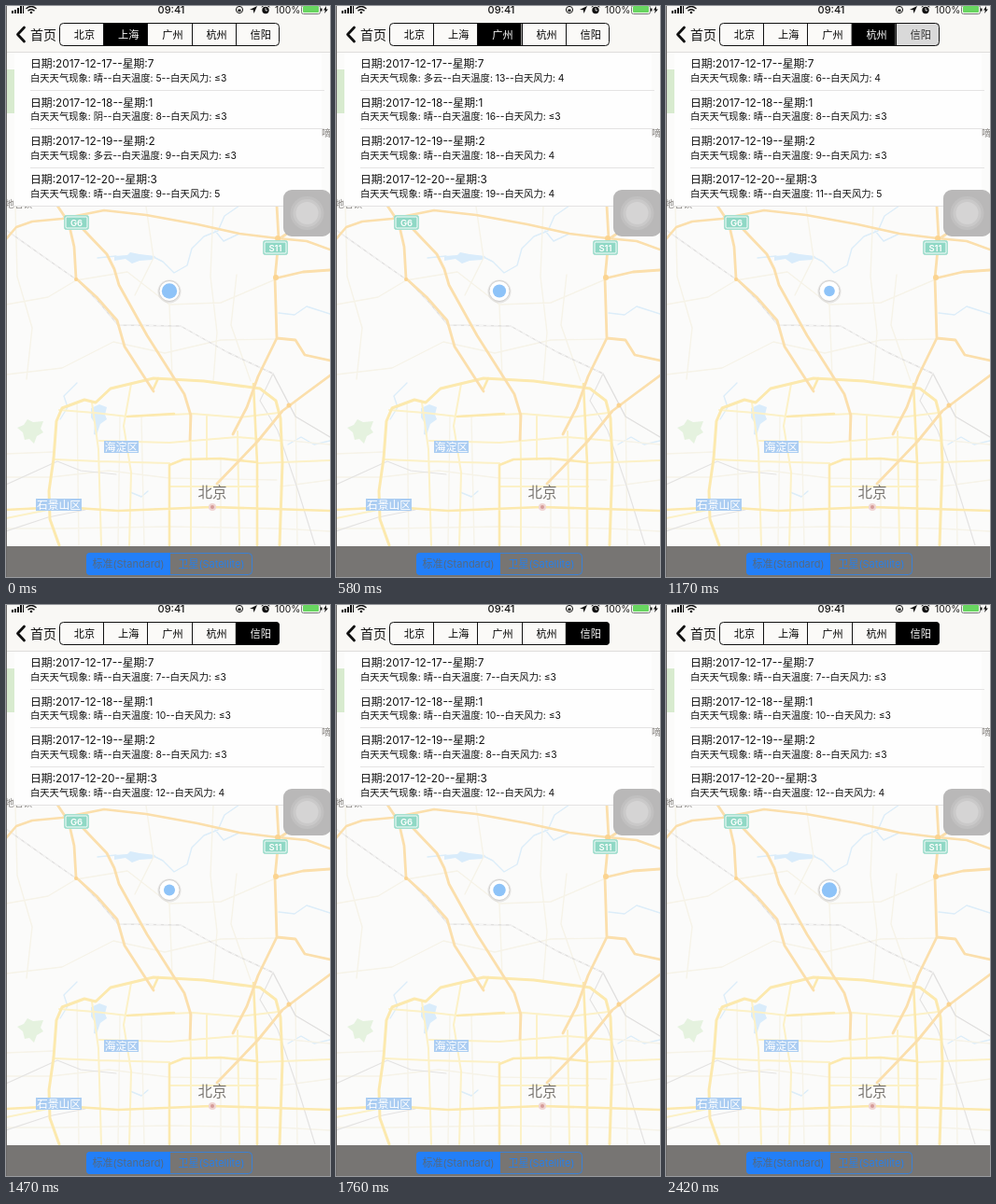
An HTML page that plays this animation: 347 by 612 pixels, repeating every 2470 ms.

```html
<!DOCTYPE html>
<html lang="zh-CN">
<head>
<meta charset="utf-8">
<title>Weather map</title>
<style>
  html, body { margin: 0; width: 100%; height: 100%; overflow: hidden; background: #fbfaf9; }
  svg { display: block; width: 347px; height: 612px; font-family: Inter, "Noto Sans CJK SC", "Noto Sans CJK", sans-serif; }
  .roads path, .line { fill: none; stroke-linejoin: round; stroke-linecap: round; }
  .mid { text-anchor: middle; }
</style>
</head>
<body>
<svg viewBox="0 0 347 612">
  <rect width="347" height="612" fill="#fbfbfa"/>

  <!-- Parks and water -->
  <path d="M0 68H9V115H0Z" fill="#d8ebcf"/>
  <path d="M12 452l7-3 4-6 6 3 11-1-3 8 3 4-7 4-3 8-5-5-5 1-2-8Z" fill="#e5f2df"/>
  <path d="M116 268l14-1 3-3 10 2 17 2-3 4-14 1-8 3-7-5-12 2Z" fill="#d9ecfb"/>
  <path d="M91 431l9-4 8 3-2 8 2 5-7 5-4 12-3-1 1-12-4-6Z" fill="#d9ecfb"/>
  <path class="line" d="M98 270L118 268M158 269L168 274 180 286 194 278 199 260 212 247 227 241 234 225 250 214M224 241L233 252 250 244M58 443L66 430 62 418 76 404M347 330L322 322 309 331 292 329M133 521L145 526 152 520M302 470L316 462 330 470 347 466" stroke="#dcedf9" stroke-width="1.4"/>

  <!-- Roads, palest first -->
  <g class="roads">
    <path d="M0 320L45 312 75 294 130 285 175 320 230 318 291 292M10 215L12 290 28 345 22 400M150 215L158 270 138 310M222 214L219 290 226 350 222 402M175 320L178 398M0 395L60 388 115 360 170 372 230 358 290 357M247 288L241 342 262 402M0 480L50 478M0 505L48 505 110 498 175 506 290 508M0 560L60 560 175 558 292 560 347 563M76 425L78 578M122 440L120 578M145 440L148 578M230 486L230 578M310 425L312 578M294 465L347 470M294 515L347 508" stroke="#f6f3e8" stroke-width="1.4"/>
    <path d="M0 240L45 272 78 295 100 318 120 342 187 343 237 371 286 394 310 440 347 462" stroke="#e0dfde" stroke-width="1.4"/>
    <path d="M286 394L272 423 291 455 313 520 331 578M0 513L55 488 80 498 118 502M0 563L45 548 85 540" stroke="#e4e3e2" stroke-width="1.2"/>
    <path d="M0 240L45 272 78 295 100 318 120 342 187 343 237 371 286 394" stroke="#fff" stroke-width=".7" stroke-dasharray="4 4"/>
    <path d="M57 433L95 436 130 440 200 437 250 441 292 436M92 425L99 475 102 578M100 466L175 468 248 462 294 466M197 437L198 486M215 440L215 486M248 456L250 578M198 486L198 578M175 515H270M134 405L126 450 134 500 132 578M52 486L100 488 175 490M270 490L347 487M0 549L60 537" stroke="#fcf1c7" stroke-width="2"/>
    <path d="M57 578L47 550 46 520 51 485 54 445 60 431 84 422 96 425 112 410 158 399 212 402 272 410 289 423 294 442 296 490 293 578" stroke="#fce9ae" stroke-width="3"/>
    <path d="M175 578V492L190 486 230 485 269 489V578M0 540L60 537 120 541 220 537 347 541M158 410L163 399M130 440L180 437M265 405L269 490" stroke="#fce9ae" stroke-width="2.6"/>
    <path d="M0 250L11 237 28 231 60 228 105 219 150 224 205 234 250 244 291 249 322 252 347 261" stroke="#fbdfac" stroke-width="2.5"/>
    <path d="M55 214L67 232 73 258 75 292 97 312 119 337 127 365 158 413M70 226L88 245 108 266 116 282 121 299 151 353 191 416 198 439 197 465" stroke="#fbdfac" stroke-width="2.8"/>
    <path d="M290 214L292 250 288 292 290 356 270 397 258 430 243 459M288 292L318 285 347 283M290 356L310 358 320 374 347 380M347 396L320 416 296 434 270 466 250 487 226 512M347 216L320 231 292 250" stroke="#fbdfac" stroke-width="2.8"/>
  </g>
  <g fill="#fbd491">
    <circle cx="291" cy="249" r="3"/><circle cx="289" cy="291" r="3"/>
    <circle cx="75" cy="293" r="2"/><circle cx="303" cy="428" r="2.5"/>
  </g>

  <!-- Map labels -->
  <g fill="#8fd8c5" stroke="#fff">
    <rect x="62.5" y="224.5" width="26" height="15" rx="2" stroke="#a5dfcf"/>
    <rect x="64" y="226" width="23" height="12" rx="1"/>
    <rect x="275.5" y="251.500" width="26" height="15" rx="2" stroke="#a5dfcf"/>
    <rect x="277" y="253" width="23" height="12" rx="1"/>
  </g>
  <g class="mid" fill="#fff" font-size="9.500" font-weight="600">
    <text x="75.500" y="235.500">G6</text><text x="288.500" y="262.500">S11</text>
  </g>
  <path d="M105 466h37v13h-37ZM32 528h49v13h-49Z" fill="#abcdf2"/>
  <g class="mid" fill="#fff" font-size="11.8" font-weight="500">
    <text x="123.500" y="477">海淀区</text><text x="56.500" y="539">石景山区</text>
  </g>
  <text class="mid" x="221" y="527" font-size="15.500" fill="#77736f">北京</text>
  <circle cx="221" cy="537" r="4" fill="#f0d4d2"/><circle cx="221" cy="537" r="2" fill="#d59a98"/>
  <g font-size="9.800" fill="#85827f">
    <text x="-1" y="216">地名镇</text><text x="338" y="140">嘀</text>
  </g>

  <!-- Location dot -->
  <circle cx="175" cy="306" r="12.500" fill="#d9d7d5" opacity=".65"/>
  <circle cx="175" cy="305.500" r="11" fill="#fff" stroke="#d2d0ce"/>
  <circle id="dot" cx="175" cy="305.500" r="8" fill="#8ec3f8"/>

  <!-- Forecast list -->
  <rect x="9" y="49" width="329" height="165" fill="#fefefe"/>
  <path d="M26 90.500H341M26 131.500H341M26 173.500H341M9 214.500H338" stroke="#e4e3e3"/>
  <g id="rows" fill="#111"></g>

  <!-- Navigation bar -->
  <rect width="347" height="49" fill="#f9f8f5"/>
  <path d="M0 49.500H347" stroke="#dedddb"/>
  <path class="line" d="M19.500 23L12.500 30.500 19.500 38" stroke="#111" stroke-width="2.8"/>
  <text x="26" y="36" font-size="14" fill="#111">首页</text>
  <clipPath id="tabShape"><rect x="57" y="18" width="236" height="25" rx="4"/></clipPath>
  <g id="tabs" font-size="11.200" class="mid" clip-path="url(#tabShape)"></g>
  <rect x="57.500" y="18.500" width="235" height="24" rx="4" fill="none" stroke="#111"/>

  <!-- Status bar -->
  <g fill="#111">
    <path d="M6 5h2v3h-2ZM9 4h2v4h-2ZM12 2h2v6h-2ZM15 0h2v8h-2ZM18 0h1v8h-1Z"/>
    <path class="line" d="M22 2.500Q27-1.500 32 2.500M24 4.800Q27 2.500 30 4.800" stroke="#111" stroke-width="1.500"/>
    <circle cx="27" cy="7" r="1.300"/>
    <text class="mid" x="177" y="8" font-size="11" font-weight="500">09:41</text>
    <circle cx="250" cy="4" r="3.600" fill="none" stroke="#111"/>
    <path d="M248.500 3.500h3v2.500h-3ZM261 4L269 0 265.500 8 264.800 4.300Z"/>
    <circle cx="278" cy="4.500" r="3.700"/>
    <path d="M278 2V4.800H280" fill="none" stroke="#fff" stroke-width=".8"/>
    <path class="line" d="M274 1L275.500 0M282 1L280.500 0" stroke="#111"/>
    <text x="288" y="8" font-size="10.300">100%</text>
    <rect x="316.500" y="-.5" width="20" height="9" rx="2" fill="none" stroke="#777"/>
    <rect x="318" y="0" width="17" height="7" rx="1" fill="#68d560"/>
    <path d="M337 2.500h1.500v3h-1.500ZM343 0L340 4.500H342L341 8 345 3.500H343Z"/>
  </g>

  <!-- Floating button -->
  <rect x="297" y="197" width="51" height="50" rx="9" fill="#b9b8b8"/>
  <circle cx="322.500" cy="222" r="18" fill="#c1c0c0"/>
  <circle cx="322.500" cy="222" r="15" fill="#cac9c9"/>
  <circle cx="322.500" cy="222" r="12" fill="#d5d4d4"/>

  <!-- Map type bar -->
  <rect y="579" width="347" height="33" fill="#777573"/>
  <rect x="86.500" y="586.500" width="177" height="23" rx="4" fill="none" stroke="#3b80d3"/>
  <path d="M176 586H90a4 4 0 0 0-4 4V606a4 4 0 0 0 4 4H176Z" fill="#237ff8"/>
  <g class="mid" font-size="11">
    <text x="131" y="602" fill="#55697f">标准(Standard)</text>
    <text x="220" y="602" fill="#287fe8">卫星(Satellite)</text>
  </g>
  <path d="M.5 0V612" stroke="#6b6968"/>
</svg>

<script>
const LOOP = 2470;
const TICKS = [0, 140, 290, 440, 580, 730, 880, 1020, 1170, 1320, 1470, 1610, 1760, 1910, 2050, 2200, 2420];
const CITIES = ["北京", "上海", "广州", "杭州", "信阳"];
const DATES = ["17--星期:7", "18--星期:1", "19--星期:2", "20--星期:3"];

// Each day: sky, temperature, wind
const FORECASTS = {
  上海: ["晴 5 ≤3", "阴 8 ≤3", "多云 9 ≤3", "晴 9 5"],
  广州: ["多云 13 4", "晴 16 ≤3", "晴 18 4", "晴 19 4"],
  杭州: ["晴 6 4", "晴 8 ≤3", "晴 9 ≤3", "晴 11 5"],
  信阳: ["晴 7 ≤3", "晴 10 ≤3", "晴 8 ≤3", "晴 12 4"]
};

// Start time, city listed, darkness of each tab
const STEPS = [
  [0, "上海", [0, 1, 0, 0, 0]],
  [290, "上海", [0, 1, .25, 0, 0]],
  [440, "上海", [0, .6, .45, 0, 0]],
  [580, "广州", [0, 0, 1, 0, 0]],
  [730, "广州", [0, 0, 1, .15, 0]],
  [880, "广州", [0, 0, .9, .3, 0]],
  [1020, "广州", [0, 0, .45, .6, 0]],
  [1170, "杭州", [0, 0, 0, 1, .15]],
  [1320, "杭州", [0, 0, 0, .45, .6]],
  [1470, "信阳", [0, 0, 0, 0, 1]]
];

const byId = id => document.getElementById(id);

function add(parent, tag, attributes, text = "") {
  const node = document.createElementNS("http://www.w3.org/2000/svg", tag);
  for (const name in attributes) node.setAttribute(name, attributes[name]);
  node.textContent = text;
  return parent.appendChild(node);
}

const gray = level => {
  const value = Math.round(255 * level);
  return `rgb(${value},${value},${value})`;
};

const tabs = CITIES.map((city, i) => {
  const x = 57 + i * 47.2;
  const box = add(byId("tabs"), "rect", { x, y: 18, width: 47.2, height: 25 });
  const label = add(byId("tabs"), "text", { x: x + 27, y: 35 }, city);
  return { box, label };
});
for (let i = 1; i < CITIES.length; i++) {
  add(byId("tabs"), "path", { d: `M${Math.round(57 + i * 47.2) + .5} 18V43`, stroke: "#111" });
}

const details = DATES.map((date, i) => {
  const y = 66.2 + i * 41.4;
  add(byId("rows"), "text", { x: 26, y, "font-size": 11.85 }, "日期:2017-12-" + date);
  return add(byId("rows"), "text", { x: 26, y: y + 14.5, "font-size": 10.3 });
});

function draw(now) {
  const time = now % LOOP;
  const tick = TICKS.findLast(start => start <= time);
  const [, city, levels] = STEPS.findLast(([start]) => start <= time);

  tabs.forEach(({ box, label }, i) => {
    box.setAttribute("fill", levels[i] ? gray(1 - levels[i]) : "#fbfaf8");
    label.setAttribute("fill", gray(levels[i] ** .9));
  });
  details.forEach((row, i) => {
    const [sky, heat, wind] = FORECASTS[city][i].split(" ");
    row.textContent = `白天天气现象: ${sky}--白天温度: ${heat}--白天风力: ${wind}`;
  });
  byId("dot").setAttribute("r", 7 + 1.2 * Math.cos(2 * Math.PI * tick / LOOP));
  requestAnimationFrame(draw);
}
draw(0);
</script>
</body>
</html>
```
